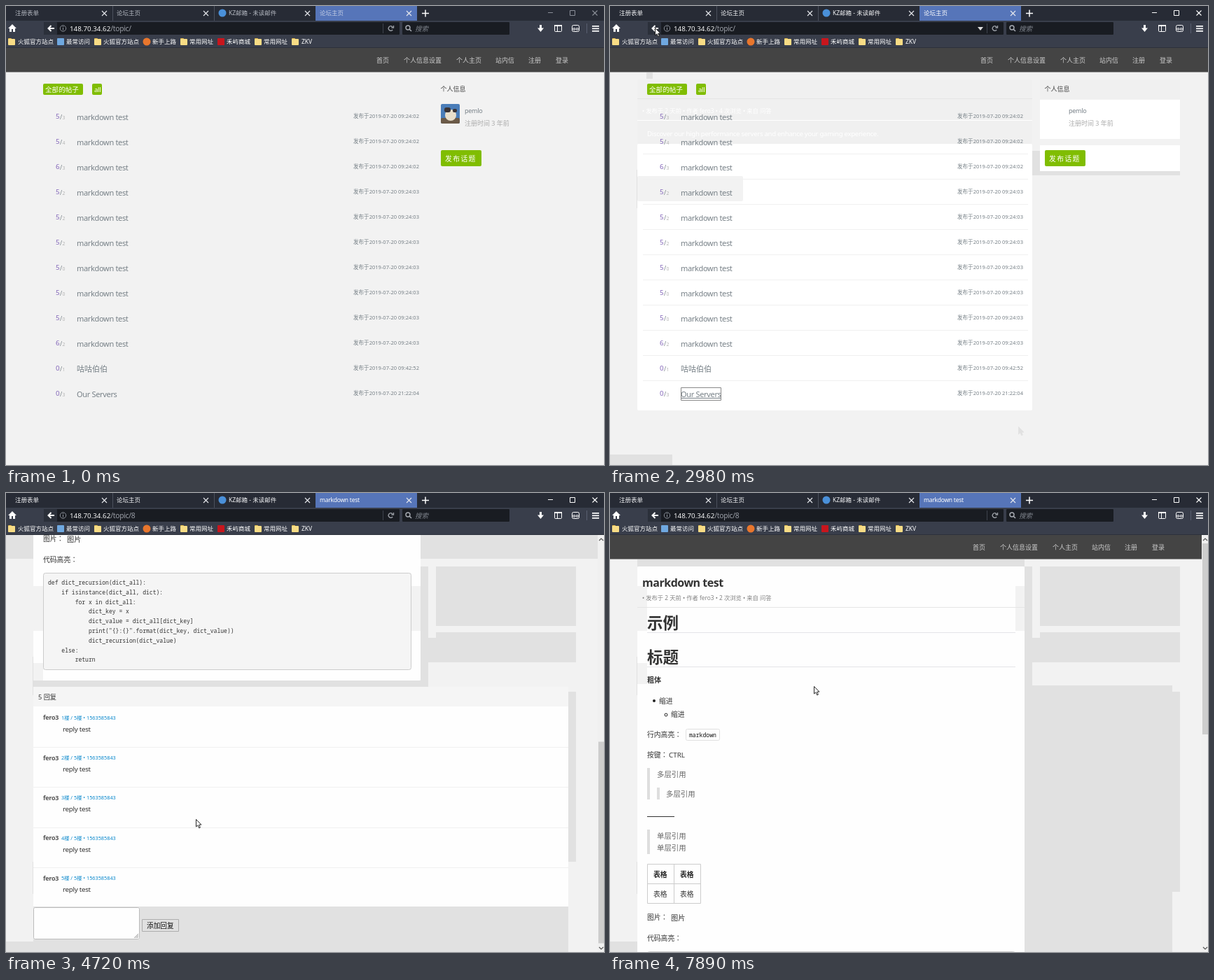
Animation of 854 by 656 pixels, one loop 8 s. Source, as an HTML page with a canvas:

```html
<!DOCTYPE html>
<html lang="zh-CN">
<head>
<meta charset="utf-8">
<title>论坛主页</title>
<style>
html, body { margin: 0; height: 100%; overflow: hidden; background: #f2f2f2; }
canvas { display: block; }
</style>
</head>
<body>
<canvas id="stage" width="854" height="656"></canvas>
<script>
const c = document.getElementById('stage').getContext('2d');
const LOOP = 8000, SHADE = '#e1e1e1', PALE = '#f2f2f2', GREEN = '#80bd01', GREY = '#778087';
const SANS = '"Noto Sans","Noto Sans CJK SC","Noto Sans CJK",sans-serif';
const CENTRED = '"Noto Sans CJK TC","Noto Sans CJK JP",sans-serif';
const MONO = '"Noto Sans Mono",monospace';
const HOST = '148.70.34.62';
const AUTHOR = 'fero3';

// Moments at which the browser switches page
const OPEN_SERVERS = 2000, BACK = 2980, OPEN_POST = 4150, REPLIED = 7490;

const pointerPath = [
  [120, 583, 601], [560, 102, 452], [890, 152, 498], [1170, 152, 498], [1400, 126, 550],
  [1560, 126, 550], [2000, 106, 173], [2060, 106, 173], [2700, 64, 31], [3000, 64, 31],
  [3640, 126, 407], [3880, 126, 407], [4420, 320, 465], [4570, 320, 465], [4700, 271, 466],
  [4900, 271, 466], [5380, 126, 593], [6660, 126, 593], [6950, 222, 613], [7150, 222, 613],
  [7780, 291, 276]
];
const scrollPath = [[4500, 0], [4520, 7], [4570, 7], [4720, 541], [4760, 541], [4780, 544]];
const typing = [[5720, 't'], [5980, 'te'], [6210, 'tes'], [6290, 'test'], [6450, 'test ']];
const votes = ['5/3', '5/4', '6/3', '5/2', '5/2', '5/2', '5/0', '5/0', '5/0', '6/2', '0/1', '0/3'];
const code = `def dict_recursion(dict_all):
    if isinstance(dict_all, dict):
        for x in dict_all:
            dict_key = x
            dict_value = dict_all[dict_key]
            print("{}:{}".format(dict_key, dict_value))
            dict_recursion(dict_value)
    else:
        return`.split('\n');

const smooth = p => p * p * (3 - 2 * p);
const linear = p => p;
const between = (t, a, b) => t >= a && t < b;

function follow(path, t, ease) {
  if (t <= path[0][0]) return path[0].slice(1);
  const i = path.findIndex(k => k[0] > t);
  if (i < 0) return path[path.length - 1].slice(1);
  const a = path[i - 1], b = path[i], p = ease((t - a[0]) / (b[0] - a[0]));
  return a.slice(1).map((v, n) => v + (b[n + 1] - v) * p);
}

function rect(x, y, w, h, color, radius = 0) {
  c.fillStyle = color;
  c.beginPath();
  c.roundRect(x, y, w, h, radius);
  c.fill();
}
const shade = (x, y, w, h) => rect(x, y, w, h, SHADE);

function frame(x, y, w, h, color, radius = 0) {
  c.strokeStyle = color;
  c.lineWidth = 1;
  c.beginPath();
  c.roundRect(x + .5, y + .5, w - 1, h - 1, radius);
  c.stroke();
}

function line(color, width, ...points) {
  c.strokeStyle = color;
  c.lineWidth = width;
  c.beginPath();
  for (let i = 0; i < points.length; i += 2) c.lineTo(points[i], points[i + 1]);
  c.stroke();
}

function disc(x, y, r, color) {
  c.fillStyle = color;
  c.beginPath();
  c.arc(x, y, r, 0, 7);
  c.fill();
}

function ring(x, y, r, color, width = 1, from = 0, to = 7) {
  c.strokeStyle = color;
  c.lineWidth = width;
  c.beginPath();
  c.arc(x, y, r, from, to);
  c.stroke();
}

// y is the visual middle of the line; returns the width
function text(s, x, y, size, color, style = '', family = SANS) {
  c.font = `${style} ${size}px ${family}`;
  const latin = family === SANS && /^[ -~]+$/.test(s) && /[a-z]/.test(s);
  c.letterSpacing = (latin ? -.03 * size : 0) + 'px';
  c.fillStyle = color;
  c.fillText(s, x, y + size * .37);
  return c.measureText(s).width;
}

function cross(x, y, r, color) {
  line(color, 1.1, x - r, y - r, x + r, y + r);
  line(color, 1.1, x - r, y + r, x + r, y - r);
}

function arrow(x, y, fill = '#fff', edge = '#111') {
  c.beginPath();
  for (const [dx, dy] of [[0, 0], [0, 10.5], [2.4, 8.3], [4.2, 12.3], [5.9, 11.6], [4.2, 7.7], [7.4, 7.6]])
    c.lineTo(x + .5 + dx, y + .5 + dy);
  c.closePath();
  c.fillStyle = fill;
  c.fill();
  c.strokeStyle = edge;
  c.lineWidth = .9;
  c.stroke();
}

function navBar(y, width, shift) {
  rect(0, y, width, 34.5, '#444');
  ['首页', '个人信息设置', '个人主页', '站内信', '注册', '登录'].forEach((s, i) =>
    text(s, [529, 568, 643, 699, 746, 785][i] - shift, y + 18, 9, '#ccc'));
}

function row(i, white, hover) {
  const y = 159 + 36 * i;
  const title = i < 10 ? 'markdown test' : i === 10 ? '咕咕伯伯' : 'Our Servers';
  const time = i < 3 ? '09:24:02' : i < 10 ? '09:24:03' : i === 10 ? '09:42:52' : '21:22:04';
  const [replies, views] = votes[i].split('/');
  text(replies, 71, y - 1.5, 9.8, white || '#8265b8');
  text('/', 77, y - .5, 8.5, white || GREY);
  text(views, 80.5, y, 6.8, white || '#b4b4b4');
  const w = text(title, 101, y, 11, white || GREY);
  if (hover) line(GREY, 1, 101, y + 5.5, 101 + w, y + 5.5);
  text('发布于2019-07-20 ' + time, 496, y - 2, 7.55, white || GREY);
}

function meta(y, views, color) {
  text(`• 发布于 2 天前 • 作者 ${AUTHOR} • ${views} 次浏览 • 来自 问答`, 46, y, 8.3, color);
}

function servers(color) {
  meta(150, 4, color === '#fff' ? color : '#838383');
  text('Discover our high performance servers and enhance your gaming experience.', 53, 182, 9.6, color);
}

function avatar() {
  rect(621, 140, 27, 28, '#4a7db8', 2);
  rect(621, 160, 27, 8, '#6b5a48', 2);
  disc(635, 156, 8, '#e9dfcb');
  rect(626, 145, 9, 7, '#3a3436', 3);
  rect(638, 147, 6, 5, '#3a3436', 2);
}

function listPage(hover, returned, focused) {
  navBar(60, 854, 0);
  if (returned) {
    shade(603, 207, 211, 35);
    shade(38, 234, 1, 55);
    shade(0, 641, 89, 15);
    shade(52, 95, 9, 9);
    rect(39, 105, 564, 92, '#f0f0f0', 2);
    rect(39, 132, 564, 1, '#e5e5e5');
    rect(39, 163, 564, 1, '#fff');
    servers('#fff');
    rect(39, 197, 564, 381, '#fff', 2);
    rect(39, 243, 151, 36, PALE, 2);
    for (let y = 211; y < 560; y += 36) rect(47, y, 550, 1, '#f0f0f0');
    rect(614, 105, 200, 28, '#f0f0f0');
    rect(614, 134, 200, 56, '#fff');
    rect(614, 199, 200, 37, '#fff');
    arrow(583, 601, SHADE, SHADE);
  } else avatar();
  rect(53, 111, 57, 16, GREEN, 2);
  text('全部的帖子', 56, 119, 9.6, '#fff');
  rect(123, 111, 14, 16, GREEN, 2);
  text('all', 126, 119, 9.6, '#fff');
  votes.forEach((v, i) => row(i, '', i === hover || focused && i === 11));
  if (focused) frame(101, 545, 58, 19, '#888');
  text('个人信息', 620.5, 119, 9, '#444');
  text('pemlo', 655, 150, 9, GREY);
  text('注册时间 3 年前', 655, 168, 9, '#ababab');
  rect(621, 206, 58, 23, GREEN, 2);
  [...'发布话题'].forEach((s, i) => text(s, 627 + 11.2 * i, 218, 9.8, '#fff'));
}

function replyForm(y, fill, focus) {
  rect(39, y, 152, 46, fill, 2);
  if (focus) { c.shadowColor = '#66afe9'; c.shadowBlur = 4; }
  frame(39, y, 152, 46, focus ? '#5cb0ec' : '#bbb', 2);
  c.shadowBlur = 0;
  for (const d of [2, 4, 6]) line('#888', .8, 189 - d, y + 44, 189, y + 44 - d);
  rect(194, y + 17, 53, 18, SHADE);
  frame(194, y + 17, 53, 18, '#adadad');
  text('添加回复', 201, y + 26, 9.7, '#111');
}

function serversPage(t) {
  const dy = t > 2140 ? 9 : 0;
  navBar(60, 854, 0);
  rect(39, 105, 564, 28, '#fafafa', 2);
  row(0, '#fff');
  row(1, '#fff');
  rect(39, 163, 564, 1, '#e2e2e2');
  rect(39, 175, 564, 1, '#fafafa');
  text('Our Servers', 46, 128, 16, '#333', 'bold');
  servers('#333');
  shade(39, 197, 564, 381);
  shade(614, 105, 200, 85);
  shade(614, 199, 200, 37 + dy);
  shade(603, 234, 211, 2 + dy);
  rect(39, 207 + dy, 775, 27, '#fafafa');
  text('0 回复', 46, 221 + dy, 9.2, '#333');
  replyForm(234 + dy, '#f3f3f3', false);
  rect(40, 248, 150, 1, '#fafafa');
  text('5/2', 71, 265, 9, '#fff');
  text('markdown test', 101, 267, 11, '#fff');
  arrow(583, 601, SHADE, SHADE);
  shade(0, 641, 89, 15);
}

function article(s, views) {
  const label = (str, x, y, size = 9.8, color = '#333', style = '') => text(str, x, y - s, size, color, style);
  const bar = (x, y, h) => rect(x, y - s, 4, h, '#dedede');
  const caption = (str, y) => text('：', 53 + label(str, 53, y), y - s, 9.8, '#333', '', CENTRED);
  label('markdown test', 46, 128, 16, '#333', 'bold');
  meta(150 - s, views, '#838383');
  rect(39, 163 - s, 553, 1, '#e5e5e5');
  label('示例', 53, 186, 22.5, '#333', 'bold');
  label('标题', 53, 235, 22.5, '#333', 'bold');
  for (const y of [199, 248]) rect(53, y - s, 526, 1, '#e4e4e8');
  label('粗体', 53, 267.5, 10, '#333', 'bold');
  disc(63, 297 - s, 2, '#222');
  label('缩进', 70, 297);
  ring(80, 317 - s, 2, '#222');
  label('缩进', 87, 316.5);
  caption('行内高亮', 345);
  frame(108, 337 - s, 49, 17, '#e0e0e0', 2);
  text('markdown', 113, 346 - s, 8.1, '#111', '', MONO);
  caption('按键', 374);
  label('CTRL', 84, 374);
  bar(53, 393, 45);
  bar(67, 421, 17);
  bar(53, 481, 35);
  label('多层引用', 67, 402.5, 10.4, '#666');
  label('多层引用', 80, 430.5, 10.4, '#666');
  rect(53, 462 - s, 39, 1, '#333');
  label('单层引用', 67, 490, 10.4, '#666');
  label('单层引用', 67, 507.5, 10.4, '#666');
  frame(53, 530 - s, 77, 57, '#ccc');
  rect(91, 530 - s, 1, 57, '#ccc');
  rect(53, 558 - s, 77, 1, '#ccc');
  for (const x of [62, 100]) {
    label('表格', x, 545, 9.8, '#222', 'bold');
    label('表格', x, 573);
  }
  caption('图片', 606);
  label('图片', 87, 607, 10.2);
  caption('代码高亮', 636);
  rect(53, 655 - s, 526, 139, '#f5f5f5', 3);
  frame(53, 655 - s, 526, 139, '#ccc', 3);
  code.forEach((str, i) => text(str, 60, 669 + 13.8 * i - s, 8.05, '#333', '', MONO));
}

function postPage(t, s) {
  const reloaded = t >= REPLIED, scrolled = s > 60;
  shade(0, 60, 845, 34);
  shade(614, 105, 200, 85);
  shade(614, 199, 200, 43);
  shade(603, 207, 211, 35);
  shade(603, 284, 211, 243);
  shade(592, 105, 11, reloaded ? 551 : 473);
  shade(38, 234, 1, 55);
  shade(38, 527, 1, 46);
  shade(0, 641, 89, 15);
  if (reloaded) {
    rect(0, 94, 845, 1, PALE);
    shade(592, 275, 211, 381);
    shade(803, 284, 11, 286);
    shade(39, 95, 553, 10);
  }
  navBar(60 - s, 845, 11);

  rect(39, 105 - s, 553, 704, '#fefefe', 2);
  if (scrolled || reloaded) {
    rect(39, 133, 14, 64, PALE);
    rect(579, 133, 13, 64, PALE);
    rect(39, 243, 14, 30, PALE);
  } else {
    rect(39, 105 - s, 553, 28 + s, '#fafafa');
    rect(39, 133, 553, 64, PALE);
    rect(39, 243, 151, 31, PALE);
  }
  article(s, reloaded ? 2 : 1);

  if (809 - s < 656) {
    shade(39, 809 - s, 564, 9);
    rect(39, 818 - s, 764, 314, '#fefefe');
    rect(39, 818 - s, 764, 28, '#f5f5f5');
    text('5 回复', 46, 833 - s, 9.2, '#333');
    for (let i = 0; i < 5; i++) {
      const y = 862 + 57.3 * i - s;
      text(AUTHOR, 53, y, 9, '#555', 'bold');
      text(`${i + 1}楼 / 5楼 • 1563585843`, 79, y, 7.3, '#0a88cc');
      text('reply test', 81, y + 16, 9.8, '#333');
      if (i < 4) rect(39, Math.round(y + 42), 764, 1, '#f0f0f0');
    }
    shade(39, 1132 - s, 764, 100);
    const focus = between(t, 5460, 7060), top = 1133 - s;
    replyForm(top, '#fefefe', focus);
    const typed = (typing.filter(k => k[0] <= t).pop() || [0, ''])[1];
    const w = text(typed, 44, top + 10, 9.7, '#555');
    if (focus && (t - 6210 + 5300) % 1060 < 530) rect(Math.round(44 + w), top + 5, 1, 11, '#222');
  }

  rect(845, 60, 9, 596, '#f0f0f0');
  rect(846, 72 + s * .524, 8, reloaded ? 273 : 288, '#cdcdcd');
  line('#555', 1.2, 847, 68, 850, 65, 853, 68);
  line('#555', 1.2, 847, 649, 850, 652, 853, 649);
}

function folder(x) {
  rect(x, 46, 5, 3, '#e3b94c', 1);
  rect(x, 47, 10, 9, '#f8dc85', 1);
}

function browser(t, title, path) {
  const active = t >= 1400;
  const loading = between(t, 1450, 2300) || between(t, 3790, 4300) || between(t, 7060, 7620);
  const bright = active ? '#f4f5f7' : '#b4b8c0';
  rect(0, 0, 854, 21, '#272b35');
  rect(0, 21, 854, 39, '#393e4b');
  rect(442, 0, 145, 21, '#5675b9');
  for (const x of [152, 297]) rect(x, 0, 1, 21, '#4c515d');
  text('注册表单', 13, 10, 8.5, bright);
  text('论坛主页', 158, 10, 8.5, bright);
  disc(309, 10, 5.5, '#4a90d9');
  text('KZ邮箱 - 未读邮件', 318, 10, 8.5, bright);
  if (loading) {
    ring(454, 10, 4.5, '#8fa6d6', 2);
    ring(454, 10, 4.5, '#fff', 2, t / 130, t / 130 + 4);
  }
  text(title, loading ? 463 : 448, 10, 8.5, active ? '#fff' : '#c3cde4');
  for (const x of [140.5, 285.5, 430.5, 575.5]) cross(x, 10.5, 3.5, '#e8eaee');
  line('#fff', 1.5, 594, 10.5, 604, 10.5);
  line('#fff', 1.5, 599, 5.5, 599, 15.5);
  const controls = active ? '#fff' : '#8b8f98';
  line(controls, 1, 774, 9.5, 781, 9.5);
  frame(805, 6, 8, 8, controls);
  cross(841, 10, 3.5, controls);

  // toolbar
  rect(54, 23, 508, 18, '#191c22', 1);
  rect(566, 23, 153, 18, '#191c22', 1);
  rect(54, 23, 19, 18, '#2b303a', 1);
  c.fillStyle = '#fff';
  c.beginPath();
  for (const [x, y] of [[9, 26], [15, 32], [13, 32], [13, 37], [10, 37], [10, 33], [8, 33], [8, 37], [5, 37], [5, 32], [3, 32]])
    c.lineTo(x, y);
  c.fill();
  line('#fff', 2, 64.5, 28, 60.5, 32, 64.5, 36);
  line('#fff', 2, 60.5, 32, 69, 32);
  ring(81.5, 32, 4.2, '#8d929b');
  rect(81, 31, 1, 3.5, '#8d929b');
  rect(81, 29, 1, 1, '#8d929b');
  const w = text(HOST, 91, 32, 9.8, '#f5f5f5');
  text(path, 91 + w, 32, 10.3, '#9a9ea6');
  if (between(t, 2650, 3150)) {
    c.fillStyle = '#ddd';
    c.beginPath();
    c.moveTo(525, 30); c.lineTo(533, 30); c.lineTo(529, 35);
    c.fill();
  }
  rect(538, 25, 1, 14, '#3e434d');
  if (loading) cross(549.5, 32, 3, '#a0a4ab');
  else {
    ring(549.5, 32, 3.2, '#a0a4ab', 1.3, .6, 5.6);
    line('#a0a4ab', 1.3, 553.5, 28, 553.5, 31, 550.5, 31);
  }
  ring(574, 31, 3, '#a8acb3', 1.4);
  line('#a8acb3', 1.6, 576, 33, 579, 36);
  text('搜索', 584, 32, 9.6, '#7d828b', 'italic');
  line('#fff', 3, 763.5, 27, 763.5, 32);
  c.fillStyle = '#fff';
  c.beginPath();
  c.moveTo(759, 31.5); c.lineTo(768, 31.5); c.lineTo(763.5, 37);
  c.fill();
  frame(783, 27, 11, 10, '#fff', 1);
  rect(783, 27, 11, 2, '#fff');
  rect(787, 28, 1, 8, '#fff');
  frame(808, 27, 11, 10, '#fff', 2);
  ring(811.3, 33, 1.4, '#fff');
  ring(815.7, 33, 1.4, '#fff');
  rect(829, 25, 1, 14, '#596070');
  for (const y of [28, 31.5, 35]) rect(837, y, 10, 1.7, '#fff');

  // bookmarks
  [3, 126, 249, 355, 408].forEach(folder);
  rect(73, 46, 10, 10, '#6fa8e0', 1);
  disc(201, 51, 5.5, '#e8762d');
  rect(302, 46, 10, 10, '#c8161d', 1);
  [['火狐官方站点', 17], ['最常访问', 86], ['火狐官方站点', 139], ['新手上路', 209], ['常用网址', 262],
   ['禾屿商城', 315], ['常用网址', 368], ['ZKV', 422]].forEach(([s, x]) => text(s, x, 51, 8.5, '#fff'));
  rect(0, 59, 854, 1, '#2c313b');
}

function status(s) {
  rect(0, 641, 84, 15, '#f8f8f8');
  text(s, 0, 649, 9, '#333');
}

function draw(t) {
  const [x, y] = follow(pointerPath, t, smooth);
  const [scroll] = follow(scrollPath, t, linear);
  const onServers = between(t, OPEN_SERVERS, BACK);
  rect(0, 0, 854, 656, PALE);
  if (t >= OPEN_POST) {
    postPage(t, t >= REPLIED ? 0 : Math.round(scroll));
    browser(t, 'markdown test', '/topic/8');
    if (between(t, 7060, REPLIED)) status('等待 ' + HOST);
  } else if (onServers) {
    serversPage(t);
    browser(t, 'Our Servers', '/topic/12');
    if (t < 2250) status(HOST + '/topic/2');
  } else {
    const near = Math.round((y - 159) / 36);
    const over = t > 1170 && between(x, 101, 175) && between(near, 0, 12) && Math.abs(y - 159 - 36 * near) < 9;
    listPage(over ? near : -1, t >= BACK, between(t, 1450, 3790));
    browser(t, '论坛主页', '/topic/');
    if (over) status(`${HOST}/topic/${near + 1}`);
  }
  if (t < 120) return;
  if (between(t, 5340, 6720)) {
    line('#222', 1, x + .5, y - 5, x + .5, y + 6);
    for (const d of [-5.5, 5.5]) line('#222', 1, x - 2, y + d, x + 3, y + d);
  } else arrow(Math.round(x), Math.round(y));
}

function tick() {
  draw(performance.now() % LOOP);
  requestAnimationFrame(tick);
}
tick();
</script>
</body>
</html>
```
